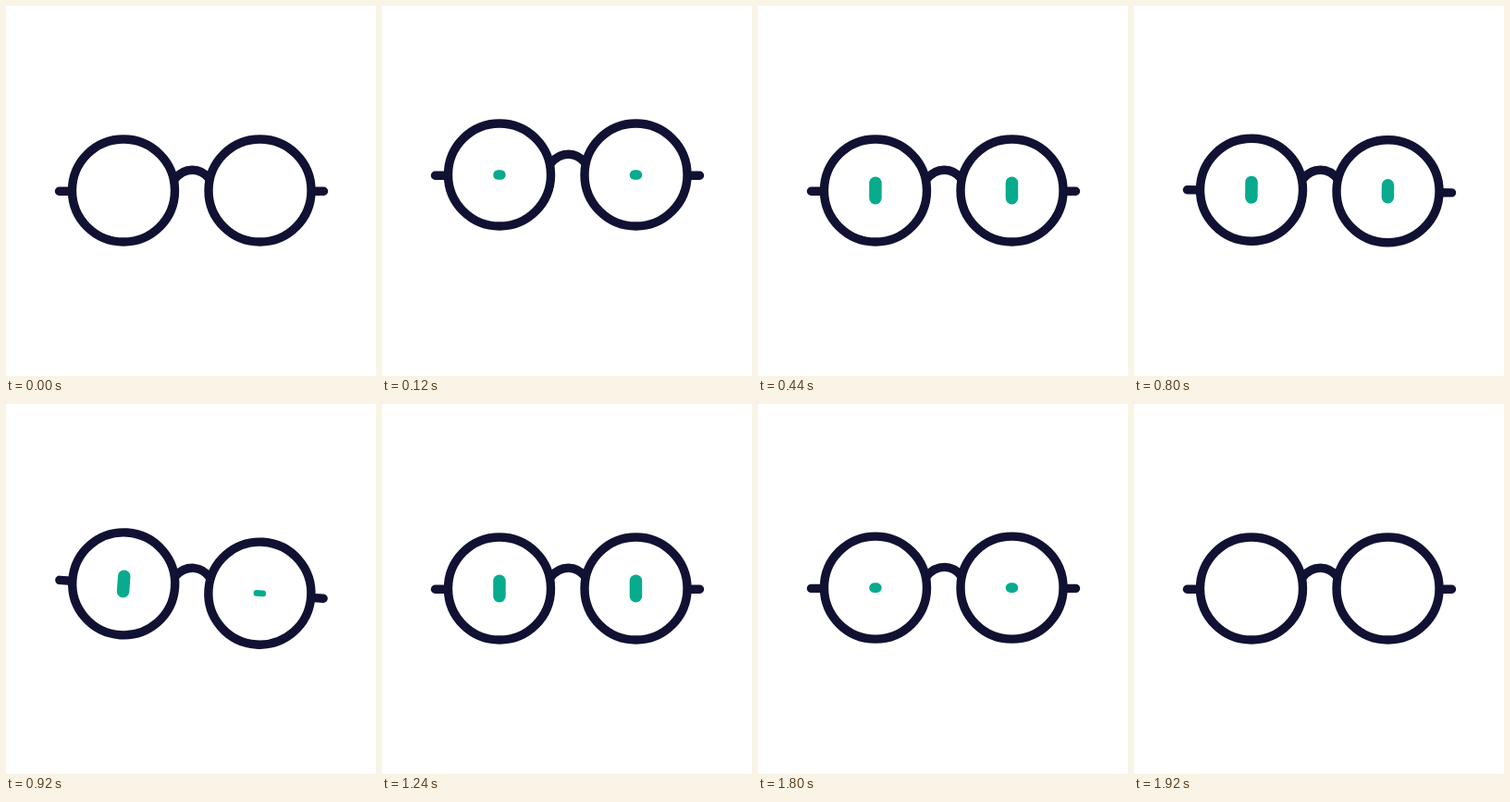
An HTML page for the animation above (1.96 s loop, 400 by 400 pixels).

```html
<!DOCTYPE html>
<html lang="en">
<head>
<meta charset="utf-8">
<title>Winking glasses</title>
<style>
html, body { margin: 0; width: 100%; height: 100%; overflow: hidden; background: #fff; }
svg { display: block; width: 100%; height: 100%; }
</style>
</head>
<body>
<svg viewBox="0 0 400 400">
  <g id="glasses">
    <g fill="none" stroke="#111133" stroke-width="9.4" stroke-linecap="round">
      <circle cx="127" cy="199.5" r="55.5"/>
      <circle cx="274.5" cy="199.5" r="55.5"/>
      <path d="M182.5 187C193 174 210 174 220 187M57.5 200.3H70M331 200.3H343.5"/>
    </g>
    <g fill="#08ab8d">
      <rect id="left" x="120.2" width="13.5"/>
      <rect id="right" x="267.7" width="13.5"/>
    </g>
  </g>
</svg>
<script>
const FRAME = 40, LOOP = 1960;
const [glasses, left, right] = ['glasses', 'left', 'right'].map(id => document.getElementById(id));

// Keys are [frame, value], eased in and out between neighbours.
const lift = [[0, 0], [3, -17], [8, 8], [11, 0], [41, 0], [42, 5.4], [43, 8], [46, -4], [48, 0]];
const open = [[1, 0], [6, 30], [42, 30], [47, 0]];
const wink = [[19, 0], [23, 1], [27, 1], [31, 0]];

function at(keys, f) {
  if (f <= keys[0][0]) return keys[0][1];
  for (let i = 1; i < keys.length; i++) {
    const [a, v] = keys[i - 1], [b, w] = keys[i];
    if (f <= b) {
      const t = (f - a) / (b - a);
      return v + (w - v) * t * t * (3 - 2 * t);
    }
  }
  return keys[keys.length - 1][1];
}

function setEye(eye, h) {
  eye.setAttribute('y', 199.5 - h / 2);
  eye.setAttribute('height', h);
  eye.setAttribute('rx', Math.min(13.5, h) / 2);
}

const start = performance.now();
function draw(now) {
  const f = Math.floor(Math.max(0, now - start) % LOOP / FRAME);
  const k = at(wink, f), h = at(open, f);
  glasses.setAttribute('transform', `translate(0 ${at(lift, f)}) rotate(${4 * k} 200.5 200)`);
  setEye(left, h);
  setEye(right, h - 23.2 * k);
  requestAnimationFrame(draw);
}
draw(start);
</script>
</body>
</html>
```
